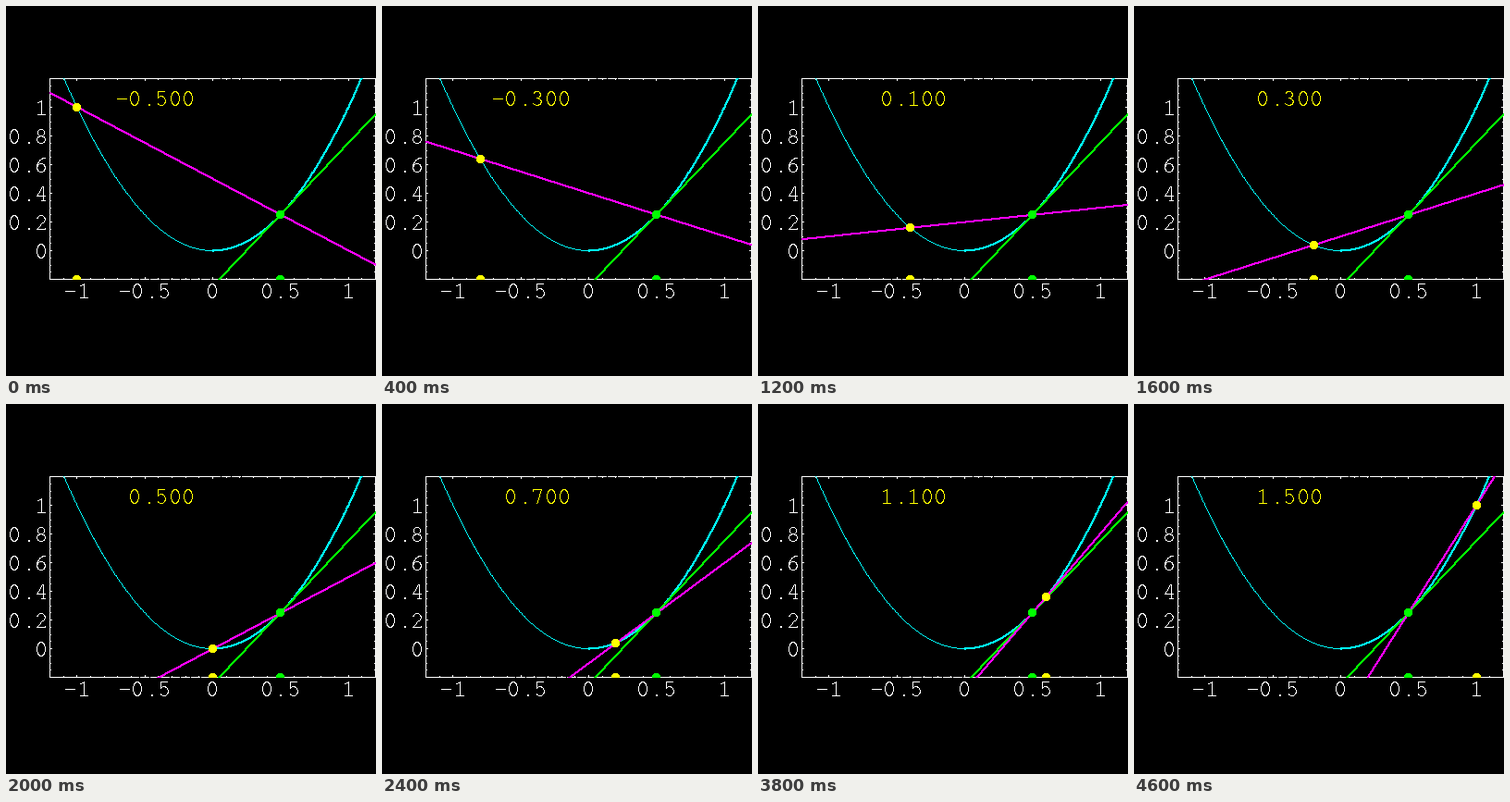
Write a matplotlib script that moves like this. It is 400x400 px and loops after 4800 ms.

```python
import numpy as np
import matplotlib.pyplot as plt
from matplotlib.animation import FuncAnimation
from matplotlib.patches import PathPatch
from matplotlib.path import Path

SIZE, DPI = 400, 100
LEFT, RIGHT, TOP, BOTTOM = 47, 399, 78, 295
ADVANCE = 14.4
CYAN, MAGENTA, GREEN, YELLOW = "#00ffff", "#ff00ff", "#00ff00", "#ffff00"
TOUCH = 0.5

# Second point of the secant: even steps, refined around the tangent point
STEPS = np.concatenate([np.arange(-10, 5) / 10,
                        [0.45, 0.475, 0.525, 0.55],
                        np.arange(6, 11) / 10])


def sx(x):
    return 223.5 + x * 352 / 2.4


def sy(y):
    return 264.5 - 155 * y


def seg(*pts):
    return np.array(pts, float)


def arc(cx, cy, rx, ry, a0=0, a1=360):
    t = np.radians(np.linspace(a0, a1, 25))
    return np.column_stack([cx + rx * np.cos(t), cy + ry * np.sin(t)])


# Stroke shapes of a light typewriter face, centred on the cell, y upwards
SIX = [arc(0, -3, 4.3, 4.5), arc(4.5, -2.5, 8.8, 10, 180, 93)]
GLYPHS = {
    "0": [arc(0, 0, 4.5, 7.5)],
    "1": [seg((-3.5, 5.5), (0, 7.5), (0, -7.5)), seg((-4, -7.5), (4, -7.5))],
    "2": [np.vstack([arc(0, 3.3, 4.2, 4.2, 165, -35),
                     seg((-4.5, -7.5), (4.5, -7.5), (4.5, -6))])],
    "3": [arc(-0.3, 3.9, 3.8, 3.6, 150, -90),
          arc(-0.3, -3.6, 4.5, 3.9, 90, -150)],
    "4": [seg((2.3, -7.5), (2.3, 7.5), (1.3, 7.5), (-4.5, -2.8), (4.5, -2.8)),
          seg((0, -7.5), (4, -7.5))],
    "5": [seg((3.5, 7.5), (-3.2, 7.5), (-3.2, 1)),
          arc(-0.1, -2.6, 4.5, 4.9, 133, -145)],
    "6": SIX,
    "7": [seg((-4.2, 6), (-4.2, 7.5), (4.2, 7.5), (4.2, 6.5), (-0.2, -7.5))],
    "8": [arc(0, 3.9, 3.8, 3.6), arc(0, -3.6, 4.4, 3.9)],
    "9": [-s for s in SIX],
    "-": [seg((-5, 0), (5, 0))],
    ".": [seg((0, -6.5), (1, -6.5)), seg((0, -7.5), (1, -7.5))],
}


def cells(pts):
    """Hard-edged path made of unit squares at whole pixel positions."""
    pts = np.unique(np.asarray(pts, int), axis=0)
    corners = np.array([(0, 0), (1, 0), (1, 1), (0, 1), (0, 0)])
    verts = (pts[:, None] + corners).reshape(-1, 2)
    codes = [Path.MOVETO] + [Path.LINETO] * 3 + [Path.CLOSEPOLY]
    return Path(verts, np.tile(codes, len(pts)))


def trace(pts, pen=1):
    """Pixels under a square pen that follows a polyline."""
    runs = []
    for a, b in zip(pts[:-1], pts[1:]):
        n = max(int(np.ceil(np.abs(b - a).max())), 1)
        runs.append(np.linspace(a, b, n + 1))
    base = np.floor(np.vstack(runs) - (pen - 1) / 2)
    return np.vstack([base + (i, j) for i in range(pen) for j in range(pen)])


def clipped(pts):
    x, y = pts.T
    return pts[(x >= LEFT) & (x <= RIGHT) & (y >= TOP) & (y <= BOTTOM)]


def line_path(xs, ys, pen=2):
    return cells(clipped(trace(np.column_stack([sx(xs), sy(ys)]), pen)))


def dot_path(x, y):
    d = np.mgrid[-4:5, -4:5].reshape(2, -1).T
    d = d[(d ** 2).sum(axis=1) <= 20]
    return cells(clipped(d + np.floor((sx(x), sy(y)))))


def text_path(text, last, y):
    """Text whose last character cell is centred on (last, y)."""
    parts = []
    for i, ch in enumerate(reversed(text)):
        x = np.floor(last - i * ADVANCE)
        parts += [trace((x, y) + s * (1, -1)) for s in GLYPHS[ch]]
    return cells(np.vstack(parts))


def add(path, color, z):
    return ax.add_patch(PathPatch(path, fc=color, ec="none", snap=False,
                                  zorder=z))


def ticks(step, major, lo, hi, horizontal):
    parts = []
    for k in range(round(lo / step), round(hi / step) + 1):
        size = 2 if k % major == 0 else 1
        p = np.floor(sx(k * step) if horizontal else sy(k * step))
        for edge, way in (((BOTTOM, -1), (TOP, 1)) if horizontal
                          else ((LEFT, 1), (RIGHT, -1))):
            mark = seg((p, edge), (p, edge + way * size))
            parts.append(trace(mark if horizontal else mark[:, ::-1]))
    return np.vstack(parts)


fig = plt.figure(figsize=(SIZE / DPI, SIZE / DPI), dpi=DPI, facecolor="black")
ax = fig.add_axes([0, 0, 1, 1])
ax.set(xlim=(0, SIZE), ylim=(SIZE, 0))
ax.set_autoscale_on(False)
ax.axis("off")

frame = trace(seg((LEFT, TOP), (RIGHT, TOP), (RIGHT, BOTTOM),
                  (LEFT, BOTTOM), (LEFT, TOP)))
add(cells(np.vstack([frame, ticks(0.1, 5, -1.2, 1.2, True),
                     ticks(0.05, 4, -0.2, 1.2, False)])), "white", 0)

for v in (-1, -0.5, 0, 0.5, 1):
    label = f"{v:g}"
    add(text_path(label, sx(v) + (len(label) - 1) * ADVANCE / 2, 308),
        "white", 6)
for v in (0, 0.2, 0.4, 0.6, 0.8, 1):
    add(text_path(f"{v:g}", 38.5, np.floor(sy(v)) + 1), "white", 6)

ends = np.array([-1.2, 1.2])
half = np.linspace(0, 1.2, 60)
add(line_path(-half, half ** 2, 1), CYAN, 1)
add(line_path(half, half ** 2), CYAN, 1)
add(line_path(ends, TOUCH ** 2 + 2 * TOUCH * (ends - TOUCH)), GREEN, 2)
for y in (TOUCH ** 2, -0.2):
    add(dot_path(TOUCH, y), GREEN, 4)

secant = add(line_path(ends, ends), MAGENTA, 3)
mover = add(dot_path(0, 0), YELLOW, 5)
foot = add(dot_path(0, -0.2), YELLOW, 5)
counter = add(text_path("0", 197.5, 100), YELLOW, 6)


def update(i):
    x = STEPS[i]
    slope = x + TOUCH
    secant.set_path(line_path(ends, TOUCH ** 2 + slope * (ends - TOUCH)))
    mover.set_path(dot_path(x, x * x))
    foot.set_path(dot_path(x, -0.2))
    counter.set_path(text_path(f"{slope:.3f}", 197.5, 100))
    return secant, mover, foot, counter


anim = FuncAnimation(fig, update, frames=len(STEPS), interval=200,
                     repeat=True, repeat_delay=0, blit=False)
plt.show()
```
